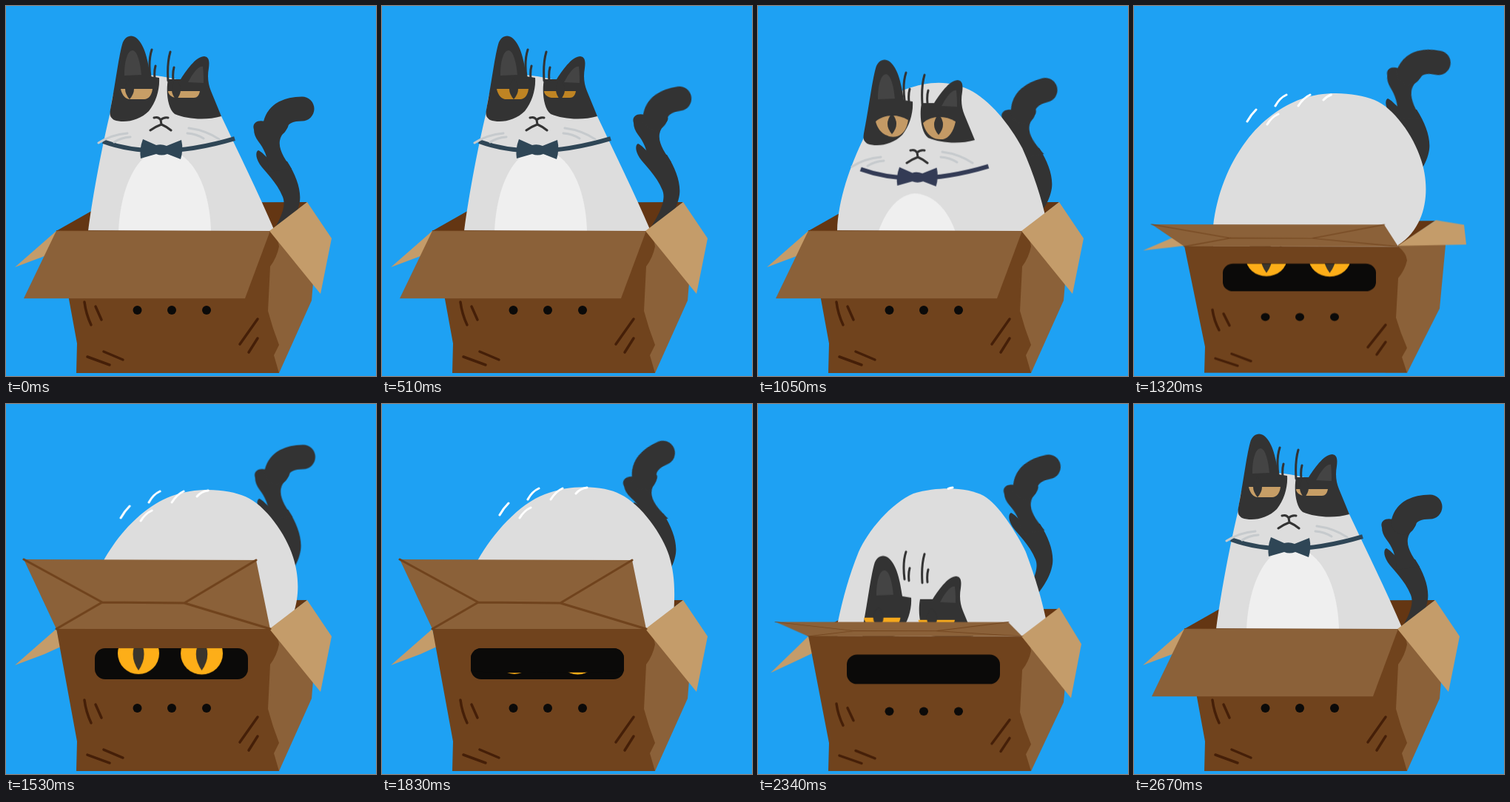
Write an HTML page that moves like this. It is 500 by 500 pixels and loops after 2.7 s.

```html
<!DOCTYPE html>
<html lang="en">
<head>
<meta charset="utf-8">
<title>Cat in a box</title>
<style>
html, body { margin: 0; width: 100%; height: 100%; overflow: hidden; background: #1ea1f3; }
svg { display: block; width: 100%; height: 100%; }
[class] { animation: 2.7s ease-in-out infinite; }
.line { fill: none; stroke-linecap: round; stroke-linejoin: round; stroke-width: 3; }

/* cat */
.body { animation-name: body; fill: #ddd; }
@keyframes body {
  0%, 25.9%, 95.6%, 100% { d: path("M111 304C118 250 131 185 141 143C145 110 150 95 170 92C200 92 225 97 245 103C275 115 282 130 291 149C315 200 340 250 363 304L360 340L107 340Z"); }
  31.1%, 91.1% { d: path("M111 304C116 240 130 155 141 111C145 78 150 63 170 60C200 60 225 65 245 71C275 83 282 98 291 117C315 175 342 245 363 304L360 340L107 340Z"); }
  31.1% { animation-timing-function: ease-in; }
  38.9% { d: path("M107 304C108 262 125 215 143 178C155 145 170 125 198 113C235 99 262 102 285 113C313 127 340 160 357 192C373 228 383 260 390 290L360 340L107 340Z"); animation-timing-function: ease-out; }
  48.9% { d: path("M107 297C112 255 127 215 152 182C172 155 200 135 225 126C262 113 300 118 325 127C350 137 378 175 388 208C399 240 400 295 357 323L360 340L107 340Z"); }
  67.8%, 82% { d: path("M107 304C108 260 118 230 130 210C150 175 185 135 220 122C255 108 300 110 322 122C350 135 380 178 388 205C397 235 396 260 393 300L360 340L107 340Z"); }
  82% { animation-timing-function: ease-in; }
  86.7% { d: path("M108 294C115 262 122 235 136 200C148 172 180 134 210 121C250 110 285 114 305 124C325 135 350 175 362 200C375 235 383 262 389 290L360 340L107 340Z"); animation-timing-function: ease-out; }
}
.belly { animation-name: belly; fill: #efefef; }
@keyframes belly {
  0%, 25.9%, 95.6%, 100% { transform: none; }
  31.1%, 91.1% { transform: translateY(-25px); }
  38.9% { transform: translateY(60px); animation-timing-function: linear; }
  43%, 86.7% { transform: translateY(112px); }
}
.face { animation-name: face; }
@keyframes face {
  0%, 25.9%, 95.6%, 100% { transform: none; }
  31.1%, 91.1% { transform: translate(0, -31px); }
  31.1% { animation-timing-function: ease-in; }
  38.9% { transform: translate(2px, 31px); animation-timing-function: linear; }
  44.4%, 82% { transform: translate(0, 270px); }
  82% { animation-timing-function: ease-in; }
  86.7% { transform: translate(0, 165px); animation-timing-function: ease-out; }
}
.muzzle { animation-name: muzzle; stroke: #333; }
@keyframes muzzle { 0%, 31.1%, 91%, 100% { transform: none; } 38.9%, 86.7% { transform: translate(4px, 12px); } }
.bow { animation-name: bow; transform-origin: 220px 195px; }
@keyframes bow {
  0%, 31.1%, 91%, 100% { transform: none; fill: #2f4656; stroke: #2f4656; }
  38.9%, 86.7% { transform: translate(3px, 5px) scale(.97); fill: #333b55; stroke: #333b55; }
}
.hair { animation-name: hair; stroke: #333; }
@keyframes hair {
  0%, 31.1%, 92%, 100% { transform: none; }
  38.9% { transform: translate(1px, -1px); }
  86.7% { transform: translate(3px, -24px); }
}

.eyes { animation-name: eyes; transform-origin: 208px 112px; }
@keyframes eyes {
  0%, 31.1%, 44%, 82%, 92%, 100% { transform: none; }
  86.7% { transform: translate(-4px, 12px) scaleX(1.15); }
  0%, 98%, 100% { fill: #c79e66; }
  18.9%, 26% { fill: #bf8423; }
  38.9% { fill: #c49a65; }
  82%, 88% { fill: #f5a81c; }
}
.eyeL { animation-name: eyeL; }
@keyframes eyeL {
  0%, 27%, 82%, 100% { d: path("M155 112C168 112 184 112 198 112C197 121 192 126 187 126C180 126 172 126 166 126C160 125 156 118 155 112Z"); }
  34%, 44% { d: path("M157 124C165 116 185 112 201 122C199 135 193 142 186 144C182 145 176 145 173 143C164 140 159 132 157 124Z"); }
}
.eyeR { animation-name: eyeR; }
@keyframes eyeR {
  0%, 27%, 82%, 100% { d: path("M219 115C232 115 248 115 262 115C261 121 258 124 254 124C246 124 236 124 229 124C223 123 219 119 219 115Z"); }
  34%, 44% { d: path("M221 126C232 116 250 115 265 124C262 138 256 146 248 148C243 148 239 148 235 146C227 142 223 134 221 126Z"); }
}
.pupils { animation-name: pupils; fill: #333; }
@keyframes pupils {
  0%, 98%, 100% { transform: translate(-11px, 0); }
  16%, 27% { transform: none; }
  34%, 44% { transform: translate(1px, 15px); }
  82%, 92% { transform: translate(-6px, 0); }
}

/* tail: three jointed pieces */
.tail { animation-name: tail; fill: #333; }
@keyframes tail {
  0%, 98%, 100% { transform: none; }
  18.9% { transform: translate(5px, -9px); }
  38.9% { transform: translate(0, -18px); }
  48.9% { transform: translate(2px, -70px); }
  67.8% { transform: translate(0, -62px); }
  86.7% { transform: translate(1px, -48px); }
}
.mid { animation-name: mid; transform-origin: 368px 215px; }
@keyframes mid {
  0%, 18.9%, 98%, 100% { transform: rotate(0deg); }
  38.9% { transform: rotate(-6deg); }
  48.9% { transform: rotate(6deg); }
  67.8% { transform: rotate(-10deg); }
  86.7% { transform: rotate(-4deg); }
}
.tip { animation-name: tip; transform-origin: 364px 160px; stroke: #333; }
@keyframes tip {
  0%, 98%, 100% { transform: rotate(0deg); }
  18.9%, 38.9% { transform: rotate(-8deg); }
  48.9% { transform: rotate(6deg); }
  67.8% { transform: rotate(-13deg); }
  86.7% { transform: rotate(-7deg); }
}

/* white strokes over the back */
.shine { animation-name: shine; stroke: #fff; }
@keyframes shine {
  0%, 48.9% { transform: none; }
  67.8%, 82% { transform: translate(6px, -6px); }
  86.7%, 100% { transform: translate(-8px, -6px); }
}
.dash { animation-name: dash; stroke-dasharray: 1 2; }
@keyframes dash {
  0%, 43% { stroke-dashoffset: 1; opacity: 0; }
  43.1% { stroke-dashoffset: 1; opacity: 1; }
  47%, 81% { stroke-dashoffset: 0; opacity: 1; }
  85% { stroke-dashoffset: -1; opacity: 1; }
  85.1%, 100% { stroke-dashoffset: -1; opacity: 0; }
}
.late { animation-delay: -2.61s; }

/* box */
.box { animation-name: box; transform-origin: 0 495px; }
@keyframes box {
  0%, 42%, 57%, 82%, 95.6%, 100% { transform: scaleY(1); }
  48.9% { transform: scaleY(.89); }
  53.3%, 91.1% { transform: scaleY(1.02); }
  86.7% { transform: scaleY(.948); }
}
.flap { animation-name: flap; transform-origin: 0 304px; }
@keyframes flap {
  0%, 41%, 94.5%, 100% { transform: scaleY(-.97); }
  48.9% { transform: scaleY(.35); animation-timing-function: ease-out; }
  53.3% { transform: scaleY(1.04); }
  56.7%, 81.1% { transform: scaleY(1); }
  81.1% { animation-timing-function: ease-in; }
  86.7% { transform: scaleY(.22); animation-timing-function: ease-out; }
  91.1% { transform: scaleY(-1.03); }
}
.panel { animation-name: panel; fill: #8b6139; }
@keyframes panel {
  0%, 41%, 92%, 100% { d: path("M68 304L24 210L323 210L357 304Z"); }
  47%, 86.7% { d: path("M68 304L24 210L338 211L357 304Z"); }
}
.crease { animation-name: crease; animation-timing-function: step-end; stroke: #70431d; }
@keyframes crease { 0%, 87.6%, 100% { opacity: 0; } 46.5% { opacity: 1; } }
.sideR { animation-name: sideR; fill: #c49c6a; }
@keyframes sideR {
  0%, 42%, 56%, 82%, 92%, 100% { d: path("M356 304L407 265L440 314L425 389Z"); }
  48.9% { d: path("M356 303L408 264L446 271L449 301Z"); }
  86.7% { d: path("M356 304L407 263L437 315L423 392Z"); }
}
.sideL { animation-name: sideL; fill: #c49c6a; }
@keyframes sideL {
  0%, 42%, 56%, 82%, 92%, 100% { d: path("M68 304L12 353L52 338L74 328Z"); }
  48.9% { d: path("M74 280L12 310L52 305L74 302Z"); }
  86.7% { d: path("M68 304L17 356L54 338L74 328Z"); }
}
.peek { animation-name: peek; }
@keyframes peek {
  0%, 44%, 86%, 100% { transform: translateY(-60px); }
  48.9% { transform: none; }
  53%, 81% { transform: translateY(16px); }
}
.lid { animation-name: lid; }
@keyframes lid {
  0%, 64%, 71.5%, 100% { transform: translateY(-50px); }
  67.2%, 68.4% { transform: none; }
}
</style>
</head>
<body>
<svg viewBox="0 0 500 500">
  <defs>
    <clipPath id="slot"><rect x="120" y="330" width="207" height="42" rx="14"/></clipPath>
    <path id="slit" d="M0 -14Q12 0 0 14Q-12 0 0 -14Z"/>
  </defs>

  <g class="box"><path fill="#643613" d="M68 304L135 266L407 265L357 304Z"/></g>

  <g class="tail">
    <path d="M350 320C372 290 379 270 374 258C366 238 350 224 343 214C336 203 338 196 341 195C346 197 350 203 356 207L380 210C392 229 399 248 397 264C394 285 380 300 366 320Z"/>
    <g class="mid">
      <path d="M335 167C332 158 340 153 350 156L381 159C384 166 372 170 370 182C368 195 378 208 386 220L354 224C356 208 349 193 341 183C337 178 335 172 335 167Z"/>
      <path class="tip line" style="stroke-width:33px" d="M364 160C368 145 382 139 400 139"/>
    </g>
  </g>

  <path class="body"/>
  <path class="belly" d="M150 370L152 304C155 240 180 195 212 193C250 195 275 240 277 304L279 370Z"/>

  <g class="face">
    <g class="bow">
      <path class="line" style="stroke-width:6px;stroke-linecap:butt" d="M131 183Q205 210 309 179"/>
      <path stroke="none" d="M185 180L203 188Q210 186 217 189L237 181Q240 194 236 207L218 200Q210 203 203 200L182 206Q180 193 185 180Z"/>
    </g>
    <path fill="#333" d="M141 140C148 105 152 70 157 52C160 40 170 38 176 43C188 53 192 75 195 95L207 97C208 112 203 130 193 142C180 155 160 159 146 154C140 150 140 146 141 140ZM219 99L236 99C247 82 258 68 268 68C275 69 275 76 274 84C272 95 273 105 277 115L291 149C270 155 245 153 228 146C218 138 216 115 219 99Z"/>
    <path fill="#444" d="M160 94C160 75 164 60 171 60C178 60 182 80 183 93ZM246 103C252 92 260 80 266 82C267 90 267 98 267 104Z"/>
    <path class="hair line" d="M197 59C194 68 193 80 195 96M202 81Q200 88 201 98M222 62C219 72 218 85 219 101M227 83Q225 90 226 100"/>
    <g class="eyes">
      <path class="eyeL"/><path class="eyeR"/>
      <g class="pupils">
        <use href="#slit" x="178" y="112"/><use href="#slit" x="241" y="113"/>
      </g>
    </g>
    <path class="line" stroke="#c6cacd" d="M125 185Q142 174 164 172M146 184Q155 178 168 177M247 165Q270 168 288 180M245 172Q258 173 267 179"/>
    <path class="muzzle line" d="M200 151Q206 149 209 154Q213 150 219 151M209 154L210 160M195 168Q202 163 210 160Q217 163 223 168"/>
  </g>

  <g class="shine line">
    <path class="dash" pathLength="1" d="M153 156Q158 147 165 140"/>
    <path class="dash" pathLength="1" d="M191 135Q197 124 206 120"/>
    <path class="dash" pathLength="1" d="M180 160Q186 150 195 146"/>
    <path class="dash" pathLength="1" d="M222 135Q229 124 238 120"/>
    <path class="dash late" pathLength="1" d="M256 127Q262 120 271 119"/>
  </g>

  <g class="box">
    <path fill="#8b6139" d="M357 304L407 266L421 302L413 398L369 496L340 496Z"/>
    <path class="sideL"/>
    <path fill="#70431d" d="M68 303L357 304Q368 314 369 325Q366 340 357 352L354 412Q360 435 369 458L362 472L369 496L95 496L96 456Z"/>
    <path class="sideR"/>
    <path class="line" style="stroke-width:3.5px" stroke="#451f08" d="M106 400Q108 416 115 431M121 406L129 424M110 474L140 485M132 467L158 478M340 423L316 457M340 449L328 468"/>
    <g fill="#0b0a09">
      <circle cx="177.5" cy="411" r="6"/><circle cx="224" cy="411" r="6"/><circle cx="271" cy="411" r="6"/>
      <rect x="120" y="330" width="207" height="42" rx="14"/>
    </g>
    <g clip-path="url(#slot)">
      <g class="peek">
        <g fill="#fdae18"><circle cx="179" cy="321" r="28"/><circle cx="264.5" cy="321" r="28.5"/></g>
        <path fill="#3a352c" d="M179 300Q194 322 179 344Q164 322 179 300ZM264.5 300Q280 322 264.5 344Q249 322 264.5 300Z"/>
      </g>
      <path class="lid" fill="#0b0a09" d="M120 300H327V361Q264 364 222 362Q180 365 120 361Z"/>
    </g>
    <g class="flap">
      <path class="panel"/>
      <path class="crease line" d="M24 210L130 268L241 269L338 211M130 268L68 304M241 269L357 304"/>
    </g>
  </g>
</svg>
</body>
</html>
```
